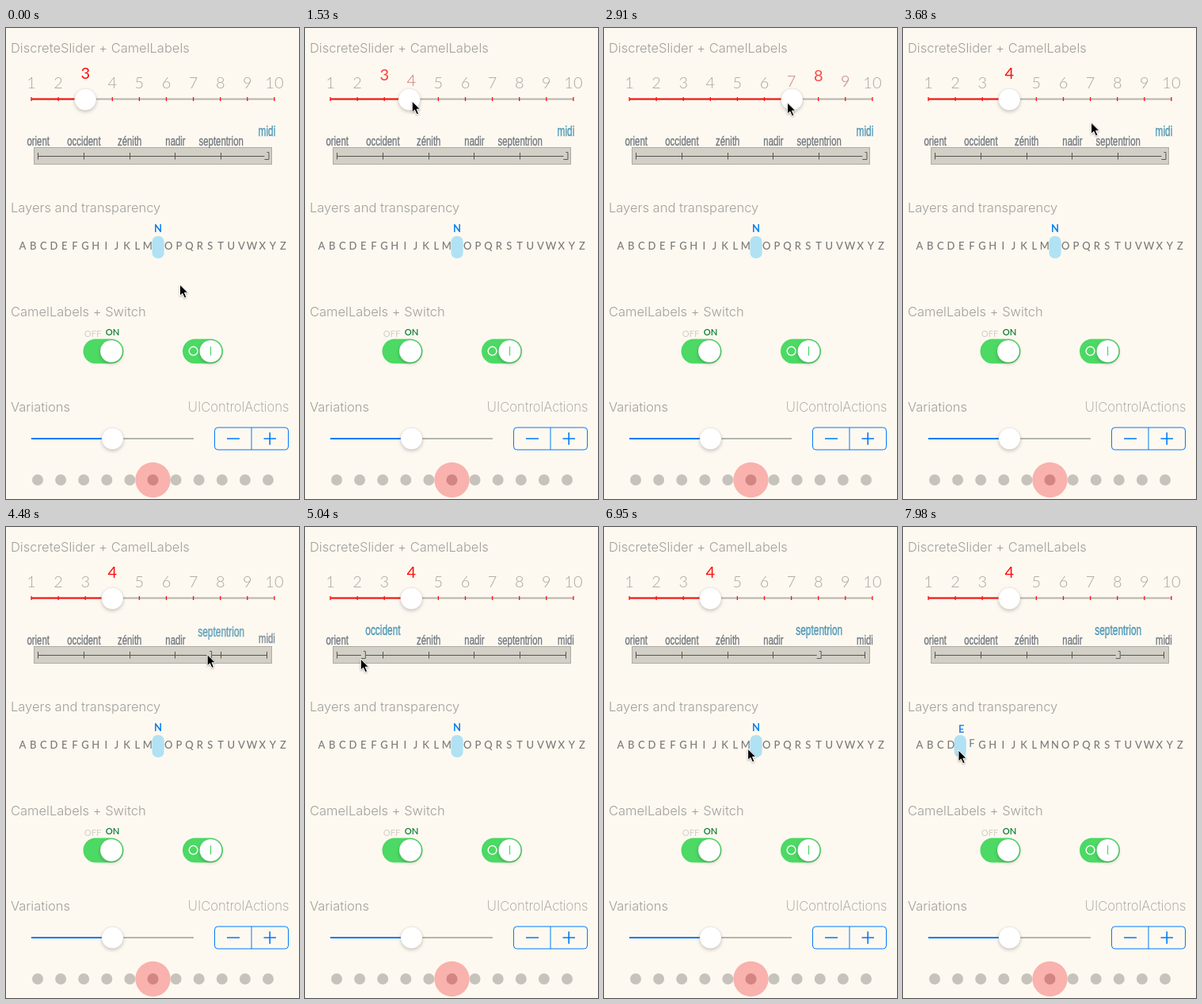
Animation, 370 px wide and 593 px high, one loop 8000 ms. Source, as an HTML page:

```html
<!DOCTYPE html>
<html lang="en">
<head>
<meta charset="utf-8">
<title>Discrete sliders</title>
<style>
  html, body { margin: 0; width: 100%; height: 100%; overflow: hidden; background: #fef9f0; }
  svg { display: block; width: 370px; height: 593px; }
  text { text-anchor: middle; }
  .title { font: 330 16.5px Inter, "Open Sans", sans-serif; fill: #a19f9c; text-anchor: start; }
  .thin { font-weight: 230; font-size: 16.7px; fill: #9c9a97; text-anchor: end; }
  .knob { fill: #fff; stroke: rgba(0,0,0,.13); stroke-width: .6; filter: drop-shadow(0 2.5px 2px rgba(0,0,0,.2)); }
  .num { font: 300 20px Lato, sans-serif; fill: #aaa59f; }
  .num.up { font-weight: 400; fill: #ff0d0d; }
  .wind { font: 16.8px "Liberation Sans", Arial, sans-serif; fill: #717881; stroke: #717881; stroke-width: .4; }
  .wind.up { font-size: 17.6px; fill: #4b97b8; stroke: #4b97b8; }
  .abc { font: 500 13px Lato, sans-serif; fill: #7b7978; }
  .abc.up { font-weight: 700; fill: #0f80f5; }
  .state { font: 400 11.2px Lato, sans-serif; fill: #d3cec7; }
  .on { font-weight: 600; fill: #0c7a35; }
  .blue { fill: none; stroke: #007aff; }
</style>
</head>
<body>
<svg viewBox="0 0 370 593">
  <text class="title" x="6" y="31">DiscreteSlider + CamelLabels</text>
  <text class="title" x="6" y="231.5">Layers and transparency</text>
  <text class="title" x="6" y="363">CamelLabels + Switch</text>
  <text class="title" x="6" y="482.5">Variations</text>
  <text class="title thin" x="357.5" y="482.5">UIControlActions</text>

  <g id="numbers">
    <path d="M32 89.5H339" stroke="#b8b4ae" stroke-width="2"/>
    <path id="fill" stroke="#ff1010" stroke-width="2.2"/>
    <path id="numTicks" stroke="#ff1010" stroke-width="1.3"/>
  </g>
  <circle id="numKnob" class="knob" cy="90" r="13.8"/>

  <g id="winds">
    <rect x="35.5" y="150.5" width="300" height="21" fill="#d2cfc6" stroke="#aeaba4"/>
    <path id="windTicks" stroke="#56544f" fill="none"/>
    <g id="windKnob">
      <rect x="-3" y="156" width="6" height="10" fill="#d2cfc6"/>
      <path d="M0 156.5H2.5V165.5H-3" fill="none" stroke="#5c5a56"/>
    </g>
  </g>

  <g id="letters"></g>
  <rect id="abcKnob" x="-7.6" y="262" width="15.2" height="28" rx="7" fill="#84d5f5" fill-opacity=".64"/>

  <text class="state" x="109.5" y="389">OFF</text>
  <text class="state on" x="134.5" y="387">ON</text>
  <g fill="#4cd964">
    <rect x="97.5" y="391.5" width="51" height="31" rx="15.5"/>
    <rect x="223" y="391.5" width="51" height="31" rx="15.5"/>
  </g>
  <circle class="knob" cx="133" cy="407" r="14"/>
  <circle class="knob" cx="258.5" cy="407" r="14"/>
  <circle cx="236.6" cy="406.7" r="5.4" fill="none" stroke="#fff" stroke-width="1.4"/>
  <path d="M258.5 401V412.5" stroke="#4cd964" stroke-width="1.3"/>

  <path d="M134 517H237" stroke="#b8b4ae" stroke-width="2"/>
  <path class="blue" d="M32 517H134" stroke-width="2"/>
  <circle class="knob" cx="134.5" cy="517" r="13.8"/>
  <rect class="blue" x="263.5" y="503" width="93" height="28" rx="4"/>
  <path class="blue" d="M310 503V531"/>
  <path class="blue" d="M279 517H295M325.5 517H341M333.2 509.3V524.7" stroke-width="1.6"/>

  <g id="dots" fill="#c6c3bd"></g>
  <circle cx="185.5" cy="569" r="22.2" fill="#f9b2ad"/>
  <circle cx="185.5" cy="569" r="7" fill="#d28582"/>

  <path id="cursor" d="M0 0V14.2L3.3 11.2L5.8 16.8L8.3 15.7L5.9 10.2H10.3Z" fill="#000" stroke="#fff"
    stroke-width="1" stroke-linejoin="round" style="filter:drop-shadow(0 1px 1px rgba(0,0,0,.3))"/>
</svg>
<script>
const LOOP = 8000, LAG = 15, FADE = 180, SNAP = 60, STEPS = 36;
const NS = "http://www.w3.org/2000/svg";
const $ = id => document.getElementById(id);

function add(parent, tag, attrs, text) {
  const el = document.createElementNS(NS, tag);
  for (const k in attrs) el.setAttribute(k, attrs[k]);
  if (text) el.textContent = text;
  return parent.appendChild(el);
}

// Pointer path: time, x, y
const path = [
  [0, 219.5, 323], [15, 219.5, 323], [238, 181, 231], [675, 181, 231], [1200, 101, 95],
  [1410, 101, 94], [1456, 116, 93], [1530, 135, 92], [2100, 254, 91.5], [2220, 278.5, 91],
  [2460, 331, 93], [2540, 333, 94], [3030, 191, 94], [3270, 123, 94], [3390, 122, 94],
  [3680, 237.5, 119], [3850, 252, 138.5], [4120, 269, 160], [4345, 269, 160],
  [5040, 70.5, 166], [5180, 43, 166], [5260, 42, 165], [5600, 165, 156], [5830, 238, 150.3],
  [5970, 262, 153], [6150, 276, 156], [6365, 276, 156], [6800, 182, 262], [6900, 178.5, 274],
  [7040, 189, 285], [7315, 189, 285], [7820, 79, 283], [7980, 70, 281]
];

const slope = (i, c) => (path[i + 1][c] - path[i][c]) / (path[i + 1][0] - path[i][0]);

function tangent(i, c) {
  if (i === 0) return slope(0, c);
  if (i === path.length - 1) return slope(i - 1, c);
  const a = slope(i - 1, c), b = slope(i, c);
  return a * b <= 0 ? 0 : 2 * a * b / (a + b);
}

// Monotone cubic through the pointer path
function pointer(t, c) {
  const last = path.length - 1;
  if (t <= 0) return path[0][c];
  if (t >= path[last][0]) return path[last][c];
  let i = 0;
  while (path[i + 1][0] <= t) i++;
  const d = path[i + 1][0] - path[i][0], u = (t - path[i][0]) / d, v = 1 - u;
  return v * v * (1 + 2 * u) * path[i][c] + u * u * (3 - 2 * u) * path[i + 1][c]
    + d * u * v * (v * tangent(i, c) - u * tangent(i + 1, c));
}

const smooth = u => u * u * (3 - 2 * u);

function makeSlider(o) {
  const group = $(o.group);
  o.items = o.names.map((name, i) => {
    const g = add(group, "g", {}), inner = add(g, "g", { transform: `scale(${o.squeeze || 1} 1)` });
    return {
      g, x: o.x0 + i * o.gap,
      down: add(inner, "text", { class: o.style }, name),
      up: add(inner, "text", { class: o.style + " up" }, name)
    };
  });
  const tickX = i => o.x0 + i * o.gap;
  const nearest = x => Math.max(0, Math.min(o.names.length - 1, Math.round((x - o.x0) / o.gap)));
  const held = t => pointer(Math.max(o.press, t - LAG), 1) + (o.shift || 0);

  o.index = t => t < o.press ? o.start : nearest(held(Math.min(t, o.release)));
  o.knobX = t => {
    if (t < o.press) return tickX(o.start);
    if (t < o.release) return held(t);
    const from = held(o.release), u = Math.min(1, (t - o.release) / SNAP);
    return from + (tickX(nearest(from)) - from) * smooth(u);
  };
  // Each label's lift is its recent selection, weighted by the ease curve
  o.draw = t => {
    const lift = o.names.map(() => 0);
    for (let k = 0; k < STEPS; k++) {
      const w = smooth((k + 1) / STEPS) - smooth(k / STEPS);
      lift[o.index(t - (k + .5) * FADE / STEPS)] += w;
    }
    o.items.forEach((it, i) => {
      it.g.setAttribute("transform", `translate(${it.x} ${o.base - o.rise * lift[i]})`);
      it.down.setAttribute("opacity", 1 - lift[i]);
      it.up.setAttribute("opacity", lift[i]);
    });
  };
  return o;
}

const numbers = makeSlider({
  group: "numbers", style: "num", names: [..."123456789", "10"],
  x0: 32, gap: 34.1, base: 76, rise: 12.3, start: 2, press: 1410, release: 3350
});
const winds = makeSlider({
  group: "winds", style: "wind", squeeze: .676,
  names: ["orient", "occident", "zénith", "nadir", "septentrion", "midi"],
  x0: 40.7, gap: 57.75, base: 148, rise: 12.3, start: 5, press: 4345, release: 6120
});
const letters = makeSlider({
  group: "letters", style: "abc", names: [..."ABCDEFGHIJKLMNOPQRSTUVWXYZ"],
  x0: 21, gap: 13.16, base: 279, rise: 22, start: 13, press: 7315, release: LOOP, shift: 1.5
});

$("numTicks").setAttribute("d", numbers.items.map(n => `M${n.x} 87V92`).join(""));
$("windTicks").setAttribute("d", "M40.5 161.5H330" +
  winds.items.map(n => `M${Math.floor(n.x) + .5} 157V165.5`).join(""));
for (let i = 0; i < 11; i++) add($("dots"), "circle", { cx: 40 + i * 29.1, cy: 569, r: 7 });

function draw(t) {
  [numbers, winds, letters].forEach(s => s.draw(t));
  const x = numbers.knobX(t);
  $("numKnob").setAttribute("cx", x);
  $("fill").setAttribute("d", `M32 89.5H${x}`);
  $("windKnob").setAttribute("transform", `translate(${winds.knobX(t)} 0)`);
  $("abcKnob").setAttribute("transform", `translate(${letters.knobX(t)} 0)`);
  $("cursor").setAttribute("transform", `translate(${pointer(t, 1)} ${pointer(t, 2)})`);
}

const begin = performance.now();
function frame() {
  draw((performance.now() - begin) % LOOP);
  requestAnimationFrame(frame);
}
frame();
</script>
</body>
</html>
```
